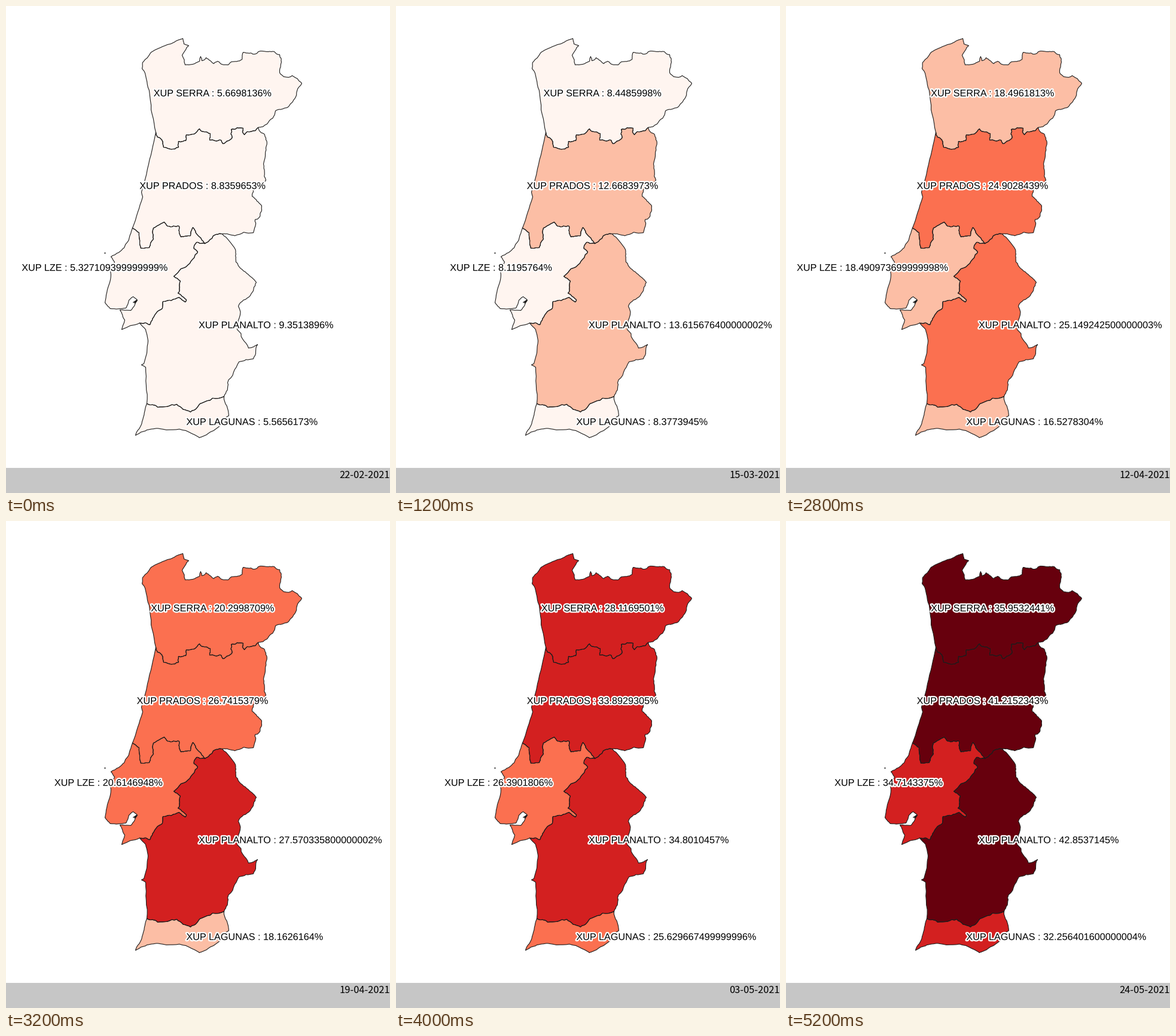
A matplotlib script that plays this animation: 642 by 815 pixels, repeating every 5600 ms.

```python
import matplotlib.pyplot as plt
import numpy as np
from matplotlib.animation import FuncAnimation
from matplotlib.patheffects import withStroke

W, H, DPI = 642, 815, 64
STEPS, STEP_MS = 14, 400
REDS = ["#fff5f0", "#fcbea5", "#fb7050", "#d32020", "#67000d"]
BREAKS = [10, 19, 27, 35]
KEY_WEEKS = [0, 3, 5, 7, 8, 10, 13]
INK = "#1c1c1c"

rng = np.random.default_rng(4)


def px(v):
    return v * 72 / DPI


def border(*pts, rough=0.07):
    """Ragged line through key points by midpoint displacement."""
    line = np.array(pts, float) + 0.5
    for _ in range(3):
        a, b = line[:-1], line[1:]
        d = b - a
        shift = rng.normal(0, rough, (len(d), 1)).clip(-2 * rough, 2 * rough)
        mid = (a + b) / 2 + shift * d[:, ::-1] * [-1, 1]
        line = np.vstack([np.stack([a, mid], 1).reshape(-1, 2), line[-1:]])
    return line


def percent(week, keys):
    """Share of people, rounded to nine decimals, as a percentage."""
    return round(float(np.interp(week, KEY_WEEKS, keys)) / 100, 9) * 100


serra_coast = border(
    (250, 211), (240, 150), (232, 112), (227, 104), (228, 94), (236, 86),
    (242, 77), (262, 67), (281, 60), (295, 54), rough=0.03)
serra_east = border(
    (295, 54), (297, 63), (305, 66), (294, 82), (299, 98), (323, 92), (325, 84),
    (327, 91), (334, 86), (347, 96), (353, 92), (371, 98), (376, 93), (394, 89),
    (396, 77), (412, 80), (438, 76), (457, 81), (460, 93), (457, 110),
    (464, 118), (478, 116), (494, 129), (482, 155), (467, 170), (450, 175),
    (436, 197), (421, 203))
serra_prados = border(
    (250, 211), (260, 223), (263, 236), (288, 236), (288, 226), (300, 225),
    (301, 215), (323, 205), (341, 213), (340, 224), (359, 224), (362, 230),
    (376, 222), (376, 206), (396, 204), (398, 215), (421, 203), rough=0.1)
prados_coast = border(
    (250, 211), (236, 272), (226, 311), (228, 319), (211, 371), rough=0.01)
prados_east = border(
    (421, 203), (432, 215), (434, 237), (430, 264), (434, 291), (413, 307),
    (411, 318), (427, 334), (424, 352), (416, 357), (413, 379), (382, 384),
    (361, 381))
prados_planalto = border((361, 381), (346, 384), (332, 397))
prados_lze = border(
    (211, 371), (222, 379), (225, 405), (239, 404), (246, 389), (246, 371),
    (264, 361), (270, 368), (289, 368), (292, 386), (308, 384), (312, 370),
    (320, 383), (332, 397))
lze_coast = border(
    (211, 371), (203, 394), (188, 412), (175, 419), (181, 428), (173, 462),
    (165, 496), (174, 506), (200, 505), (205, 492), (212, 486), (219, 492),
    (208, 509), (190, 508), (198, 525), (193, 541), (223, 530), rough=0.04)
lze_planalto = border(
    (332, 397), (318, 395), (314, 406), (320, 411), (307, 430), (280, 452),
    (291, 460), (287, 480), (301, 491), (299, 495), (289, 487), (262, 494),
    (261, 505), (251, 513), (240, 533), (223, 530))
planalto_coast = border(
    (223, 530), (233, 541), (237, 560), (235, 580), (230, 598), (226, 600),
    (233, 604), (235, 665), rough=0.02)
planalto_east = border(
    (361, 381), (383, 407), (384, 428), (402, 447), (418, 462), (408, 484),
    (388, 502), (386, 541), (405, 572), (420, 566), (413, 590), (389, 595),
    (370, 630), (364, 653))
planalto_lagunas = border(
    (235, 665), (253, 671), (285, 666), (308, 679), (327, 664), (364, 653))
lagunas_coast = border(
    (235, 665), (227, 695), (216, 718), (235, 709), (257, 707), (300, 710),
    (323, 722), (336, 716), (372, 685), (364, 653), rough=0.04)

# name, outline, label x, baseline y, alignment, percentages at the key weeks
REGIONS = [
    ("XUP SERRA", [serra_coast, serra_east, serra_prados[::-1]],
     345.8, 151.2, "center",
     [5.6698136, 8.4485998, 12.4211753, 18.4961813, 20.2998709, 28.1169501,
      35.9532441]),
    ("XUP PRADOS", [serra_prados, prados_east, prados_planalto,
                    prados_lze[::-1], prados_coast[::-1]],
     329, 306.2, "center",
     [8.8359653, 12.6683973, 17.0801068, 24.9028439, 26.7415379, 33.8929305,
      41.2152343]),
    ("XUP LZE", [prados_lze, lze_planalto, lze_coast[::-1]],
     261.6, 443.2, "right",
     [5.3271094, 8.1195764, 11.7304196, 18.4909737, 20.6146948, 26.3901806,
      34.7143375]),
    ("XUP PLANALTO", [prados_planalto[::-1], planalto_east,
                      planalto_lagunas[::-1], planalto_coast[::-1],
                      lze_planalto[::-1]],
     322, 539.2, "left",
     [9.3513896, 13.6156764, 17.4670552, 25.1492425, 27.5703358, 34.8010457,
      42.8537145]),
    ("XUP LAGUNAS", [planalto_lagunas, lagunas_coast[::-1]],
     301.4, 701.2, "left",
     [5.5656173, 8.3773945, 11.4672244, 16.5278304, 18.1626164, 25.6296675,
      32.2564016]),
]

fig = plt.figure(figsize=(W / DPI, H / DPI), dpi=DPI, facecolor="white")
ax = fig.add_axes([0, 0, 1, 1])
ax.set(xlim=(0, W), ylim=(H, 0))
ax.axis("off")

ax.fill([0, W, W, 0], [773, 773, H, H], color="#c6c6c6", lw=0)
date = ax.text(557.5, 790.3, "", family="Noto Sans CJK JP", size=px(16.4))

halo = [withStroke(linewidth=px(4.6), foreground="white")]
items = []
for name, parts, x, y, ha, keys in REGIONS:
    area, = ax.fill(*np.vstack(parts).T, lw=0, zorder=1)
    for part in parts:
        ax.plot(*part.T, color=INK, lw=px(1.1), solid_joinstyle="round", zorder=2)
    label = ax.text(x, y, "", ha=ha, va="baseline", family="Liberation Sans",
                    size=px(16.22), path_effects=halo, zorder=4)
    items.append((name, area, label, x, keys))

# river mouth and islet
ax.plot([213, 219, 215, 218], [496, 492, 497, 494], color=INK, lw=px(1.4), zorder=2)
ax.plot([164.5], [413], "o", color=INK, ms=px(2.2), mew=0, zorder=2)


def draw(i):
    for name, area, label, x, keys in items:
        value = percent(i, keys)
        area.set_facecolor(REDS[np.searchsorted(BREAKS, value)])
        label.set_text(f"{name} : {value}%")
        if label.get_ha() == "right":
            # longer numbers push the label slightly to the right
            label.set_x(x + 1.125 * (len(str(value)) - 9))
    day = np.datetime64("2021-02-22") + 7 * i
    date.set_text("-".join(reversed(str(day).split("-"))))


anim = FuncAnimation(fig, draw, frames=STEPS, interval=STEP_MS, repeat=True)
plt.show()
```
